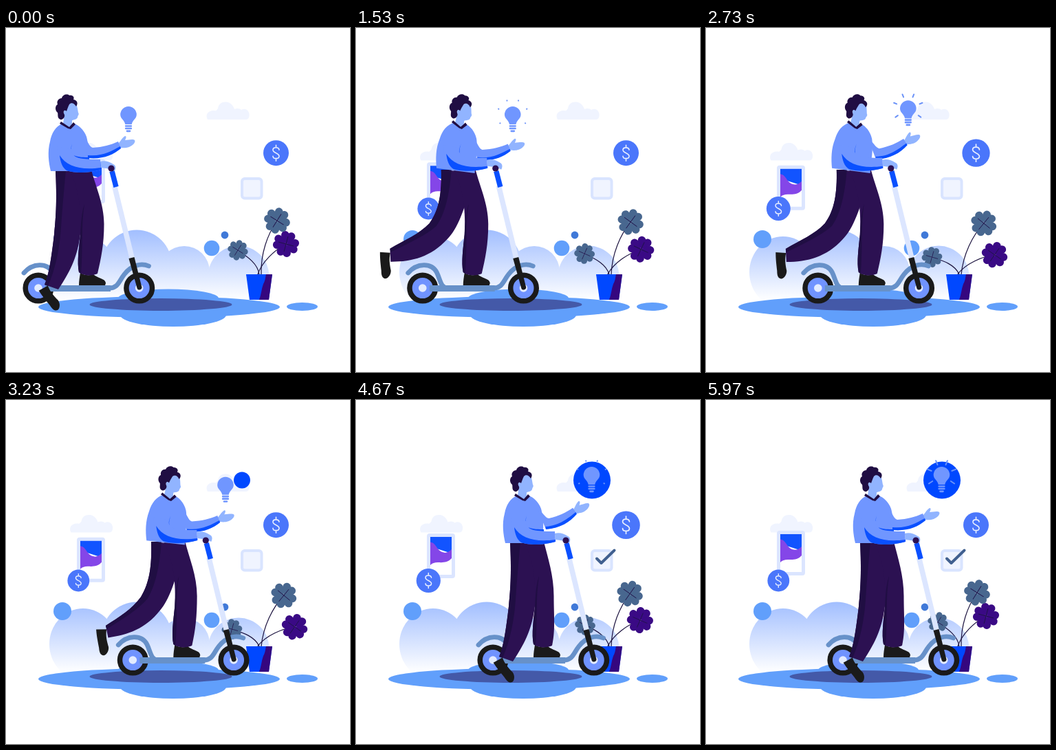
Recreate the animation shown at these times as an HTML page. Size 500x500 px, loop 6000 ms.

```html
<!DOCTYPE html>
<html lang="en">
<head>
<meta charset="utf-8">
<title>Scooter ride</title>
<style>
  html, body { margin: 0; width: 100%; height: 100%; overflow: hidden; background: #fff; }
  svg { display: block; width: 100%; height: 100%; }
  .sky { fill: #619ffb; }
  .pale { fill: #f0f4ff; }
  .shirt { fill: #7096ff; }
  .blue { fill: #0a50ff; }
  .skin { fill: #91b4ff; }
  .pants { fill: #2c1152; }
  .fold { fill: #200e43; }
  .black { fill: #1a1a1a; }
  .line { fill: none; stroke-linecap: round; stroke-linejoin: round; }
</style>
</head>
<body>
<svg viewBox="0 0 500 500">
  <defs>
    <linearGradient id="mist" gradientUnits="userSpaceOnUse" x1="0" y1="293" x2="0" y2="396">
      <stop offset="0" stop-color="#a1beff"/><stop offset="1" stop-color="#fff"/>
    </linearGradient>
    <path id="cloud" d="M293 133C289 126 294 119 303 120C306 121 306 119 308 117C309 110 314 107 320 107.500C326 108 330 112 332 118C337 116 340 117 342 119C348 115 355 121 353.500 128C353 132 351 133 348 133Z"/>
    <path id="leaf" d="M0 0C-4 -4 -12 -8 -10 -14.500C-8 -19.500 -2 -19 0 -16C2 -19 8 -19.500 10 -14.500C12 -8 4 -4 0 0Z"/>
    <g id="clover">
      <use href="#leaf"/><use href="#leaf" transform="rotate(90)"/>
      <use href="#leaf" transform="rotate(180)"/><use href="#leaf" transform="rotate(270)"/>
      <path d="M0 -11V11M-11 0H11" class="line" stroke="#20134a" stroke-width=".9"/>
    </g>
    <g id="coin">
      <circle r="18.500" fill="#4a76fb"/>
      <path d="M4.500 -4.500C4 -9 -4.500 -9 -4.500 -4.500C-4.500 0 4.500 0 4.500 4.500C4.500 9 -4.500 9 -4.500 4.500M0 -11.500V-8M0 8V11.500" class="line" stroke="#e8efff" stroke-width="1.600"/>
    </g>
    <g id="wheel">
      <circle r="18.800" fill="#7093ff" stroke="#1a1a1a" stroke-width="7.500"/>
      <circle r="5.800" fill="#e3ebff"/>
    </g>
  </defs>

  <g fill="url(#mist)">
    <ellipse cx="112" cy="355" rx="49" ry="52"/>
    <circle cx="190" cy="344.500" r="51"/>
    <circle cx="259" cy="354" r="37"/>
    <circle cx="338" cy="361" r="44.500"/>
    <rect x="82" y="358" width="290" height="37"/>
  </g>
  <g class="sky">
    <ellipse cx="222.500" cy="405.500" rx="175.500" ry="15.500"/>
    <ellipse cx="236" cy="393" rx="73" ry="13.500"/>
    <ellipse cx="243" cy="417" rx="77" ry="17"/>
    <ellipse cx="430.500" cy="405" rx="22.500" ry="6"/>
    <circle cx="82" cy="307" r="13"/>
    <circle cx="299" cy="320" r="11.300"/>
  </g>
  <circle cx="318" cy="301" r="5.400" fill="#4079d8"/>
  <ellipse cx="225" cy="402" rx="103.500" ry="9" fill="#4459a8"/>

  <use href="#cloud" class="pale"/>
  <use href="#cloud" class="pale" transform="translate(-198.500 59.500)"/>
  <g id="phone">
    <rect x="105.500" y="-2.500" width="36" height="60" rx="1.500" fill="#fff" stroke="#dbe5ff" stroke-width="5"/>
    <path d="M108 0H139V24L108 14Z" fill="#1254ff"/>
    <path d="M108 7.500C116 8 117 19 125 22C131 24 135 22 139 18V31C133 38 126 37 119 37C114 37 111 38 108 41Z" fill="#8446e8"/>
  </g>
  <use href="#coin" id="coinLeft"/>
  <use href="#coin" id="coinRight"/>
  <rect x="343" y="219" width="28.500" height="28.500" rx="4" class="pale" stroke="#d9e4ff" stroke-width="4"/>
  <path id="check" d="M350 230.500L356.500 237L375.500 218.500" class="line" stroke="#41608f" stroke-width="4" pathLength="1" stroke-dasharray="1 2"/>

  <g id="stemLeft">
    <path d="M368 358C366 343 352 333 337 323" class="line" stroke="#1d1440" stroke-width="1.200"/>
    <use href="#clover" fill="#48678f" transform="translate(337 323) rotate(32) scale(.78)"/>
  </g>
  <g id="stemRight">
    <path d="M366 358C372 340 390 323 407 314" class="line" stroke="#1d1440" stroke-width="1.200"/>
    <use href="#clover" fill="#3a0a85" transform="translate(407 314) rotate(15)"/>
  </g>
  <g id="stemTop">
    <path d="M371 358C370 328 380 300 394 280" class="line" stroke="#1d1440" stroke-width="1.200"/>
    <use href="#clover" fill="#48678f" transform="translate(394 280) rotate(32)"/>
  </g>
  <path d="M349 358H387L382 395H354Z" fill="#0048ff"/>
  <path d="M378 358H387L382 395H368C371 388 371 380 374 372C377 367 377 362 378 358Z" fill="#35077f"/>

  <circle id="disc" cx="343" cy="116.500" r="27" fill="#0048ff"/>
  <g id="bulb">
    <path d="M-11.800 0A11.800 12 0 0 1 11.800 0C11.800 6 5.500 8 4.800 14H-4.800C-5.500 8 -11.800 6 -11.800 0Z" class="shirt"/>
    <path d="M-3.800 16.500H3.800M-3.800 20H3.800M-2 23.800H2" class="line" stroke="#7096ff" stroke-width="2.700"/>
    <path id="rays" class="line" stroke="#6b92f8" stroke-width="2"/>
  </g>

  <g id="rider">
    <use href="#wheel" x="47" y="378"/>
    <use href="#wheel" x="193.700" y="378"/>
    <path d="M26 356C39 341 60 341 67.500 355C73 366 73 378 84 378H150C163 378 164 368 172 358C182 345 196 341 207.500 346" class="line" stroke="#6791c9" stroke-width="6.800"/>
    <path d="M57 378.500H152" stroke="#6791c9" stroke-width="9"/>
    <path d="M157.500 229L183.500 336" stroke="#dce6ff" stroke-width="7.500"/>
    <path d="M154 208L160 231" stroke="#0a50ff" stroke-width="7.500"/>
    <path d="M178.500 335L186.500 333L197.500 377C197.500 381 191.500 382 190.500 378Z" class="black"/>

    <path id="kickShoe" class="black" d="M-8 -3L7 -2C5 8 6 14 8 24C8 31 3 35.500 0 35.500C-5 35 -6 30 -6 24C-7 14 -8 8 -8 -3Z"/>
    <path d="M108 356C115 360 121 360 127 358C133 364 145 364 145 371L144 374H106C106 368 107 362 108 356Z" class="black"/>
    <path id="kickLeg" class="pants"/>
    <path id="kickFold" class="fold"/>
    <path id="standLeg" class="pants"/>
    <path d="M114 256C109 285 112 320 109 357L106 355C103 340 106 320 108 300C109 282 110 268 114 256Z" class="fold"/>

    <g id="torso">
      <path d="M82 139C72 143 66 153 64 165C60 180 62 195 65 208H121L120 188C121 180 119 165 117 158C113 147 105 141 99 139L92 145Z" class="shirt"/>
      <path d="M85 124H96V139L92 146L83 139Z" class="skin"/>
      <path d="M80 136L92 144L98 137L101 140L94 147L90 146L78 139Z" class="fold"/>
      <g id="farArm">
        <path d="M162 169C166 166 168 160 173 157C176 157 174 161 173 163C178 163 184 161 187 163C189 166 184 171 179 173C174 175 168 174 164 174Z" class="skin"/>
        <path d="M112 158C120 164 120 172 126 174C141 173 152 170 163 165L167 175C155 184 140 190 119 189Z" class="shirt"/>
        <path d="M119 185C140 187 153 179 166 172L167 175C155 185 140 191 119 189Z" class="blue"/>
      </g>
      <path d="M96 168C94 176 94 182 98 185C106 188 113 188 121 188V192H104C95 190 92 180 96 168Z" class="blue"/>
      <path d="M84 114L100 107C104 113 104 118 105 123C107 126 104 127 104 130C102 134 97 133 95 135L84 133Z" class="skin"/>
      <path d="M79 133C74 131 76 126 75 123C71 120 71 113 75 111C73 106 77 102 81 102C82 97 89 95 92 98C97 97 100 101 98 104C104 105 105 110 102 114C99 109 95 108 92 111C90 115 89 118 88 121C85 118 82 121 85 126C86 130 82 134 79 133Z" class="fold"/>
      <g id="nearArm">
        <path d="M137 194C143 192 150 194 156 198C160 200 160 204 158 208L152 205C148 204 143 204 138 203Z" class="skin"/>
        <path d="M74 172L95 176C96 186 102 189 112 190C121 191 128 191 137 191L138 206C120 211 100 211 88 207C78 203 74 190 74 172Z" class="shirt"/>
        <path d="M78 185C88 201 108 207 138 203V206C120 211.500 98 211 88 207C82 203 79 195 78 185Z" class="blue"/>
      </g>
    </g>
    <circle cx="153" cy="204" r="4.600" class="pants"/>
  </g>
</svg>
<script>
const LOOP = 6000;
const el = id => document.getElementById(id);
const put = (id, value) => el(id).setAttribute('transform', value);
const mix = (a, b, k) => a + (b - a) * k;
const smooth = (t, from, to) => {
  const u = Math.min(1, Math.max(0, (t - from) / (to - from)));
  return u * u * (3 - 2 * u);
};

// Leg outlines: a start point and two curves down, the cuff, two curves back.
const legDown = [72,206, 74,250, 73,270, 70,300, 66,335, 62,360, 56,373, 76,380, 96,350, 104,330, 108,300, 112,280, 116,260, 121,210];
const legBack = [74,206, 75,240, 71,265, 57,284, 42,300, 22,308, 0,321, 1,340, 32,340, 59,333, 83,307, 98,292, 108,265, 123,210];
const foldDown = [...legDown.slice(0, 14), 61,375, 72,350, 78,320, 80,290, 82,260, 84,240, 87,206];
const foldBack = [...legBack.slice(0, 14), 1,326, 27,313, 53,301, 67,288, 81,268, 86,240, 89,206];

function outline(a, b, k) {
  const p = a.map((v, i) => mix(v, b[i], k).toFixed(2));
  return `M${p.slice(0, 2)}C${p.slice(2, 14)}L${p.slice(14, 16)}C${p.slice(16)}Z`;
}

// The supporting leg straightens as the ride ends.
function standLeg(straight) {
  const waist = 124 - 3 * straight, knee = 142.5 - 7 * straight;
  return `M92 206H${waist}C${waist + 6} 230 ${knee} 255 ${knee} 285C${knee} 315 138 335 133 357` +
    'C125 361 112 360 106 355C103 340 106 320 108 300C109 280 110 240 92 206Z';
}

// Sparks grow inward from a ring, then fly outward and vanish.
const rayAngles = [-158, -112, -68, -22, 34, 146];
function rays(t) {
  const p = t / 1040 % 1;
  if (p < .44) return '';
  const fly = smooth(p, .72, 1);
  const outer = 22.3 + 6 * fly;
  const inner = outer - 6.5 * smooth(p, .43, .75) * (1 - fly);
  return rayAngles.map(deg => {
    const x = Math.cos(deg * Math.PI / 180), y = Math.sin(deg * Math.PI / 180);
    return `M${x * inner} ${y * inner}L${x * outer} ${y * outer}`;
  }).join('');
}

function draw(t) {
  const wave = Math.cos(2 * Math.PI * t / LOOP);
  const sway = (1 - wave) / 2;
  const beat = t % 2000;
  const pulse = beat < 1200 ? Math.sin(Math.PI * beat / 1200) ** 2 : 0;
  const ride = 152 * smooth(t, 0, 4000);
  const lean = smooth(t, 0, 800) * (1 - smooth(t, 3000, 4000));
  const kick = lean * (1 + .1 * smooth(t, 700, 1150) * (1 - smooth(t, 1150, 1600)));

  put('phone', `translate(0 ${195 + 5 * (1 - wave)})`);
  put('coinLeft', `translate(105.3 262.5) scale(${.86 * (1 + .11 * pulse)})`);
  put('coinRight', `translate(392.5 181.7) scale(${1 + .1 * pulse})`);
  put('stemTop', `rotate(${7.5 * sway} 368 358)`);
  put('stemRight', `rotate(${20 * sway} 368 358)`);
  put('stemLeft', `rotate(${-16.5 * sway} 368 358)`);

  const drawn = smooth(t, 4100, 4500);
  el('check').style.visibility = drawn > 0 ? 'visible' : 'hidden';
  el('check').setAttribute('stroke-dashoffset', 1 - drawn);

  put('rider', `translate(${ride} 0)`);
  put('torso', `translate(${2 * lean} 0) rotate(${7.5 * lean} 98 208)`);
  put('nearArm', `rotate(${-7.5 * lean} 80 198)`);
  put('farArm', `rotate(${-6.5 * lean - 10.5 * pulse} 116 160)`);
  put('kickShoe', `translate(${mix(56, -6.5, kick)} ${mix(380, 329, kick)}) rotate(${-33 * (1 - kick)})`);
  el('kickLeg').setAttribute('d', outline(legDown, legBack, kick));
  el('kickFold').setAttribute('d', outline(foldDown, foldBack, kick));
  el('standLeg').setAttribute('d', standLeg(smooth(t, 2900, 3800)));

  const docked = smooth(t, 3000, 4000);
  put('bulb', `translate(${mix(178 + ride, 342.5, docked)} ${mix(126 - 10 * pulse, 109, docked)})`);
  el('rays').setAttribute('d', rays(t));
  el('disc').setAttribute('r', 27 * smooth(t, 3000, 3500));
}

const start = performance.now();
function tick() {
  draw((performance.now() - start) % LOOP);
  requestAnimationFrame(tick);
}
tick();
</script>
</body>
</html>
```
